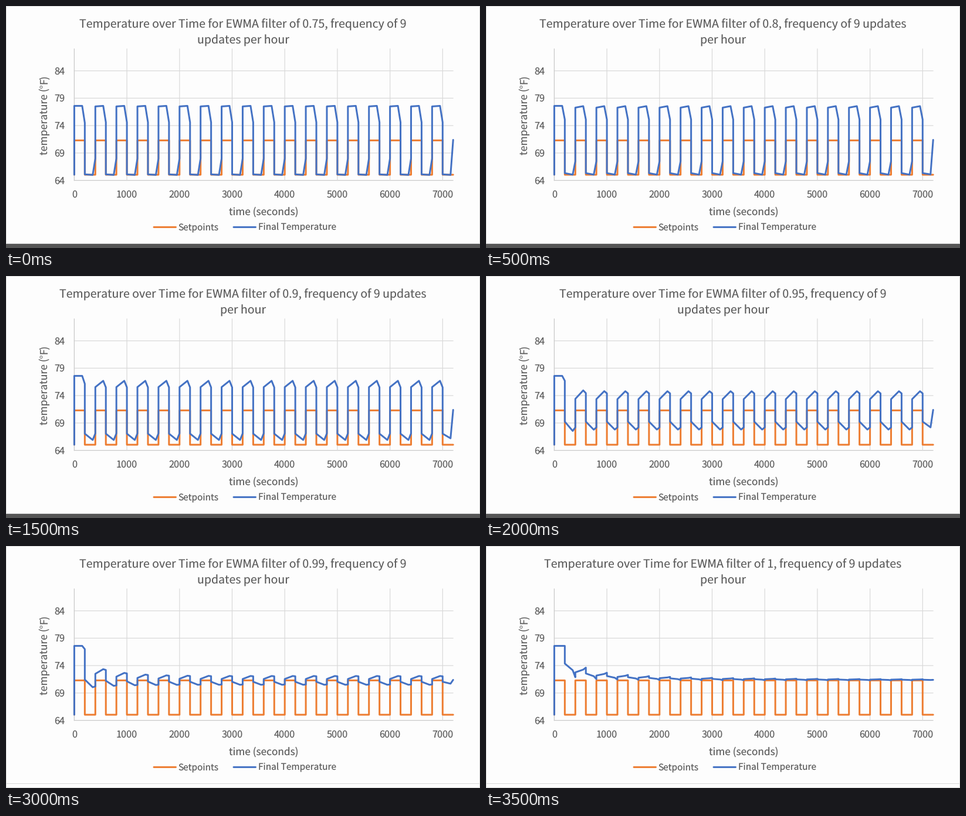
These frames come from a looping animation (808 px wide and 413 px high, 4000 ms). A matplotlib script:

```python
import matplotlib.pyplot as plt
import numpy as np
from matplotlib.animation import FuncAnimation
from matplotlib.patches import Rectangle

W, H, DPI = 808, 413, 64
PT = 72 / DPI  # points per pixel

ORANGE, BLUE = "#ED7D31", "#4472C4"
INK, GRID, AXIS, PAPER = "#5E5E5E", "#D9D9D9", "#C8C8C8", "#FDFDFD"
LEFT, RIGHT = 116.4, 762
LOW, HIGH, MIRROR, START, GOAL = 65.03, 71.3, 142.6, 77.6, 71.4

plt.rcParams["font.family"] = "Noto Sans CJK JP"
plt.rcParams["text.hinting"] = "none"

# Per filter: label, level at 200 s, steady low (start, trough, end), last trough
FILTERS = [
    ("0.75", 74.5, (65.1, 65.0, 68.0), 65.0),
    ("0.8", 75.1, (65.32, 65.05, 67.5), 65.1),
    ("0.85", 75.6, (65.95, 65.22, 67.0), 65.35),
    ("0.9", 76.15, (67.05, 65.9, 67.1), 66.2),
    ("0.95", 76.7, (69.25, 67.8, 68.2), 68.2),
    ("0.975", 76.9, (70.45, 69.4, 69.57), 69.75),
    ("0.99", 77.0, (71.05, 70.5, 70.55), 70.7),
    ("1", 77.6, None, None),
]

# Early drift: offsets of the first low and first high phase, decay per cycle
DRIFT = {
    "0.95": ((0, -0.25, 0), (0.05, 0.15, 0.05), 0.1),
    "0.975": ((0.15, -0.4, -0.27), (0.5, 0.6, 0.45), 0.35),
    "0.99": ((0.4, -0.45, -0.35), (0.95, 1.25, 1.15), 0.45),
}
NO_DRIFT = ((0, 0, 0), (0, 0, 0), 0)


def phase_levels(label, low, n):
    """Levels of low phase n and of the high phase that follows it."""
    if low is None:
        down = HIGH + np.array([2.15, 1.3, 0.4]) / (n + 0.7)
        up = HIGH + np.array([2.2, 2.95, 3.5]) / (n + 1.5)
        return down, up
    low = np.array(low)
    d_low, d_high, decay = DRIFT.get(label, NO_DRIFT)
    fade = decay ** n
    return low + np.array(d_low) * fade, MIRROR - low + np.array(d_high) * fade


def temperature(label, first, low, last):
    pts = [(0, LOW), (0, START), (150, START), (200, first)]
    steps = np.array([0, 150, 200])
    for n in range(17):
        t = 200 + 400 * n
        down, up = phase_levels(label, low, n)
        pts += zip(t + steps, down)
        pts += zip(t + 200 + steps, up)
    down, _ = phase_levels(label, low, 17)
    pts += [(7000, down[0]), (7150, last or down[1]), (7200, GOAL)]
    return np.array(pts)


def setpoints():
    pts = [(0, LOW)]
    for n in range(18):
        t = 400 * n
        pts += [(t, HIGH), (t + 200, HIGH), (t + 200, LOW), (t + 400, LOW)]
    pts[-1] = (7200, LOW)
    return np.array(pts)


fig = plt.figure(figsize=(W / DPI, H / DPI), dpi=DPI, facecolor=PAPER)
ax = fig.add_axes([0, 0, 1, 1])


def line(x, y, color=GRID, width=1.2, **kw):
    ax.plot(x, y, color=color, lw=width * PT, snap=False, **kw)


def curve(x, y, color):
    line(x, y, color, 3, solid_joinstyle="round", solid_capstyle="round")


def text(x, y, s, size, ha="center", **kw):
    ax.text(x, y, s, fontsize=size * PT, color=INK, ha=ha, va="baseline", **kw)


def draw_card(i):
    """Card border and the strip below it."""
    if i < 5:
        ax.add_patch(Rectangle((0, 406), W, 7, color="#555555", lw=0))
    bottom = 412.5 if i >= 5 else 405.5
    for x in (0.5, W - 0.5):
        line([x, x], [0, bottom], width=1)
    rows = [0.5, bottom] if i == 5 else [0.5, 405.5, bottom]
    for y in rows:
        line([0, W], [y, y], width=1)


def draw_title(label):
    head = f"Temperature over Time for EWMA filter of {label}, frequency of 9"
    tail = "updates per hour"
    if len(label) < 4:
        head, tail = head + " updates", "per hour"
    text(404, 37.6, head, 19.55)
    text(404, 64.6, tail, 19.55)


def draw_y_label(bottom):
    kw = dict(ha="left", rotation=90, rotation_mode="anchor")
    text(70.5, bottom, "temperature (", 17.6, **kw)
    text(70.5, bottom - 114, "°", 17.6, family="Liberation Sans", **kw)
    text(70.5, bottom - 121, "F)", 17.6, **kw)


def draw(i):
    ax.clear()
    ax.set(xlim=(0, W), ylim=(H, 0))
    ax.axis("off")
    label = FILTERS[i][0]
    tall = i == 5
    base, scale = (302.7, 9.5) if tall else (297.6, 9.35)
    fig.set_facecolor("#FBFBFB" if tall else PAPER)

    def px(t):
        return LEFT + t * 0.0897

    def py(temp):
        return base - (temp - 64) * scale

    draw_card(i)
    draw_title(label)
    draw_y_label(257 if tall else 254)

    top = py(88)
    for temp in range(64, 85, 5):
        y = py(temp)
        line([LEFT, RIGHT], [y, y], AXIS if temp == 64 else GRID)
        text(100, y + 5.8, str(temp), 16.3, ha="right")
    for t in range(0, 7001, 1000):
        x = px(t)
        line([x, x], [top, base], AXIS if t == 0 else GRID)
        text(x, base + 29, str(t), 16.3)

    for pts, color in ((setpoints(), ORANGE),
                       (temperature(*FILTERS[i]), BLUE)):
        curve(px(pts[:, 0]), py(pts[:, 1]), color)

    text(438.8, 361.4 if tall else 356.4, "time (seconds)", 17.25)
    y = 384.8 if tall else 377.4
    for x, color, name in ((252, ORANGE, "Setpoints"),
                           (388, BLUE, "Final Temperature")):
        curve([x, x + 37.5], [y, y], color)
        text(x + 41.5, y + 5.3, name, 15.4, ha="left")


anim = FuncAnimation(fig, draw, frames=len(FILTERS), interval=500,
                     init_func=lambda: None, repeat=True, repeat_delay=0)
plt.show()
```
